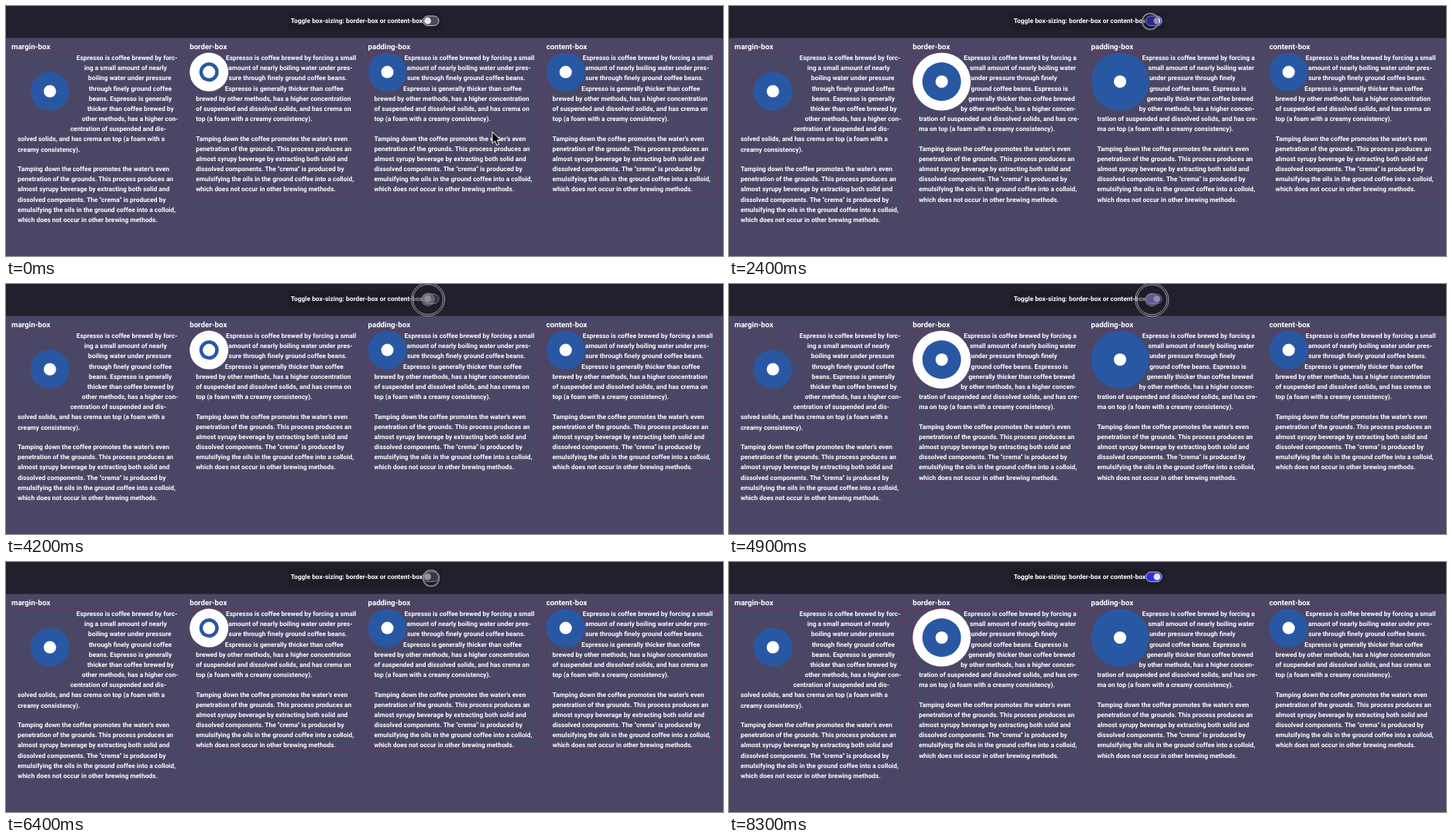
Recreate the animation shown at these times as an HTML page. Size 926 by 324 pixels, loop 8.4 s.

```html
<!DOCTYPE html>
<html lang="en">
<head>
<meta charset="utf-8">
<title>shape-outside and box-sizing</title>
<style>
  html, body { margin: 0; width: 100%; height: 100%; overflow: hidden; background: #4a4766; }
  svg { display: block; }
  text { font: 600 8.38px Roboto, "Open Sans", sans-serif; fill: #fff; text-rendering: geometricPrecision; }
  .heading { font-size: 9.7px; }
  .frame { fill: none; stroke: #6f3159; stroke-dasharray: 2 1; }
</style>
</head>
<body>
<script>
const LOOP = 8400, STEP = 100, LINE = 13.17;
const BLUE = '#2858a4', WHITE = '#fff';
const COLUMN_X = [7, 237.2, 467.5, 697.8];

const MARGIN_WRAP = {
  offsets: [84, 94, 99, 100, 100, 98, 91, 76],
  lines: ['Espresso is coffee brewed by forc-', 'ing a small amount of nearly', 'boiling water under pressure',
    'through finely ground coffee', 'beans. Espresso is generally', 'thicker than coffee brewed by',
    'other methods, has a higher con-', 'centration of suspended and dis-',
    'solved solids, and has crema on top (a foam with a', 'creamy consistency).']
};
const SMALL_WRAP = {
  offsets: [46.9, 50.1, 50.4, 45.5],
  lines: ['Espresso is coffee brewed by forcing a small', 'amount of nearly boiling water under pres-',
    'sure through finely ground coffee beans.', 'Espresso is generally thicker than coffee',
    'brewed by other methods, has a higher concentration', 'of suspended and dissolved solids, and has crema on',
    'top (a foam with a creamy consistency).']
};
const LARGE_WRAP = {
  offsets: [66, 73.7, 75.4, 75.4, 72, 62],
  lines: ['Espresso is coffee brewed by forcing a', 'small amount of nearly boiling water',
    'under pressure through finely', 'ground coffee beans. Espresso is', 'generally thicker than coffee brewed',
    'by other methods, has a higher concen-', 'tration of suspended and dissolved solids, and has cre-',
    'ma on top (a foam with a creamy consistency).']
};
const TAMPING = ['Tamping down the coffee promotes the water\u2019s even',
  'penetration of the grounds. This process produces an', 'almost syrupy beverage by extracting both solid and',
  'dissolved components. The "crema" is produced by', 'emulsifying the oils in the ground coffee into a colloid,',
  'which does not occur in other brewing methods.'];

function add(parent, tag, attrs, content = '') {
  const node = document.createElementNS('http://www.w3.org/2000/svg', tag);
  for (const key in attrs) node.setAttribute(key, attrs[key]);
  node.textContent = content;
  return parent.appendChild(node);
}
const set = (node, attrs) => { for (const key in attrs) node.setAttribute(key, attrs[key]); };
const show = (node, visible) => node.setAttribute('visibility', visible ? 'visible' : 'hidden');
const disc = (parent, cx, cy, r, fill) => add(parent, 'circle', { cx, cy, r, fill });

const svg = add(document.body, 'svg', { width: 926, height: 324, viewBox: '0 0 926 324' });
add(svg, 'rect', { width: 926, height: 324, fill: '#4a4766' });
add(svg, 'rect', { width: 926, height: 41.5, fill: '#23202d' });
add(svg, 'rect', { x: 363, y: 8.5, width: 200, height: 22, rx: 2, fill: '#1e1c27' });
add(svg, 'text', { x: 367.7, y: 22 }, 'Toggle box-sizing: border-box or content-box');
['margin-box', 'border-box', 'padding-box', 'content-box'].forEach((name, i) =>
  add(svg, 'text', { x: COLUMN_X[i], y: 56, class: 'heading' }, name));

function drawColumn(parent, index, wrap, { cx, cy, outer, inner = outer, edge = BLUE }) {
  const x = COLUMN_X[index];
  const rows = wrap.lines.length;
  const height = (rows + TAMPING.length + 1) * LINE;
  add(parent, 'rect', { class: 'frame', x, y: 60.5, width: 222.5, height });
  disc(parent, x + cx, cy, outer, edge);
  if (inner < outer) disc(parent, x + cx, cy, inner, BLUE);
  disc(parent, x + cx, cy, 8, WHITE);
  wrap.lines.forEach((line, i) =>
    add(parent, 'text', { x: x + (wrap.offsets[i] ?? 8), y: 70 + i * LINE }, line));
  TAMPING.forEach((line, i) =>
    add(parent, 'text', { x: x + 8, y: 70 + (rows + i - 1) * LINE + 25.5 }, line));
}

const small = { cx: 25, cy: 85.6, outer: 25 };
const large = { cx: 37.5, cy: 98, outer: 37.5 };
const borderBox = add(svg, 'g');
const contentBox = add(svg, 'g');
drawColumn(svg, 0, MARGIN_WRAP, { cx: 49.7, cy: 110.5, outer: 25 });
drawColumn(svg, 3, SMALL_WRAP, small);
drawColumn(borderBox, 1, SMALL_WRAP, { ...small, inner: 12.5, edge: WHITE });
drawColumn(borderBox, 2, SMALL_WRAP, small);
drawColumn(contentBox, 1, LARGE_WRAP, { ...large, inner: 25, edge: WHITE });
drawColumn(contentBox, 2, LARGE_WRAP, large);

const track = add(svg, 'rect', { x: 538.5, y: 13, width: 20.5, height: 12.4, rx: 6.2, stroke: '#c9c8d2' });
const knob = disc(svg, 544.5, 19.2, 4.4, '#e6e6ee');

const arrow = add(svg, 'path', {
  d: 'M0 0V15L3.5 11.8L6 17.5L8.7 16.3L6.3 10.8H11Z', fill: '#000', stroke: WHITE, 'stroke-width': 1
});
const ring = add(svg, 'circle', { r: 10.3, fill: '#1e1c28', 'fill-opacity': .4, stroke: '#858391', 'stroke-width': 1.8 });
const ripple = add(svg, 'g');
const waves = [0, 1].map(() => add(ripple, 'circle',
  { fill: '#1e1c28', 'fill-opacity': .3, stroke: '#bcbbc6', 'stroke-width': .9 }));
const rippleCore = disc(ripple, 0, 0, 9, '#8a8894');
set(rippleCore, { 'fill-opacity': .6 });

// Each click flips the switch, which starts off.
const CLICKS = [1700, 3000, 4300, 5000, 5600, 6300, 6850, 7600, 8150];
// time, x, y
const POINTER = [[0, 628, 163], [300, 622, 140], [800, 562, 42], [1000, 552, 28], [1500, 545, 20],
  [2400, 544, 20], [4200, 545, 20], [5800, 548, 21], [7000, 550, 21], [LOOP, 550, 21]];

function pointerAt(t) {
  const i = POINTER.findIndex(p => p[0] > t);
  const [t0, x0, y0] = POINTER[i - 1], [t1, x1, y1] = POINTER[i];
  const k = (t - t0) / (t1 - t0), e = k * k * (3 - 2 * k);
  return [x0 + (x1 - x0) * e, y0 + (y1 - y0) * e];
}

function draw(t) {
  const passed = CLICKS.filter(c => c <= t);
  const on = passed.length % 2 === 1;
  show(borderBox, !on);
  show(contentBox, on);

  const slide = passed.length ? Math.min(1, (t - passed.at(-1) + STEP) / 200) : 1;
  const position = on ? slide : 1 - slide;
  set(track, { fill: on ? '#302ee0' : '#4c4a57' });
  set(knob, { cx: 544.5 + 8.3 * (passed.length ? position : 0) });

  const [x, y] = pointerAt(t);
  const place = { transform: `translate(${x} ${y})` };
  const click = CLICKS.find(c => t >= c - 200 && t < c + 100);
  const gone = t >= 8200;
  [arrow, ring, ripple].forEach(node => set(node, place));
  show(arrow, t < 900);
  show(ring, t >= 900 && !click && !gone);
  show(ripple, click && !gone);
  if (click) {
    const k = (t - click + 200) / 300;
    const r = 11 + 15 * (1 - (1 - k) ** 3);
    set(waves[0], { r });
    set(waves[1], { r: r - 2.2 });
    set(ripple, { opacity: 1 - .3 * k });
  }
}

const start = performance.now();
function tick() {
  const t = (performance.now() - start) % LOOP;
  draw(Math.floor(t / STEP) * STEP);
  requestAnimationFrame(tick);
}
tick();
</script>
</body>
</html>
```
